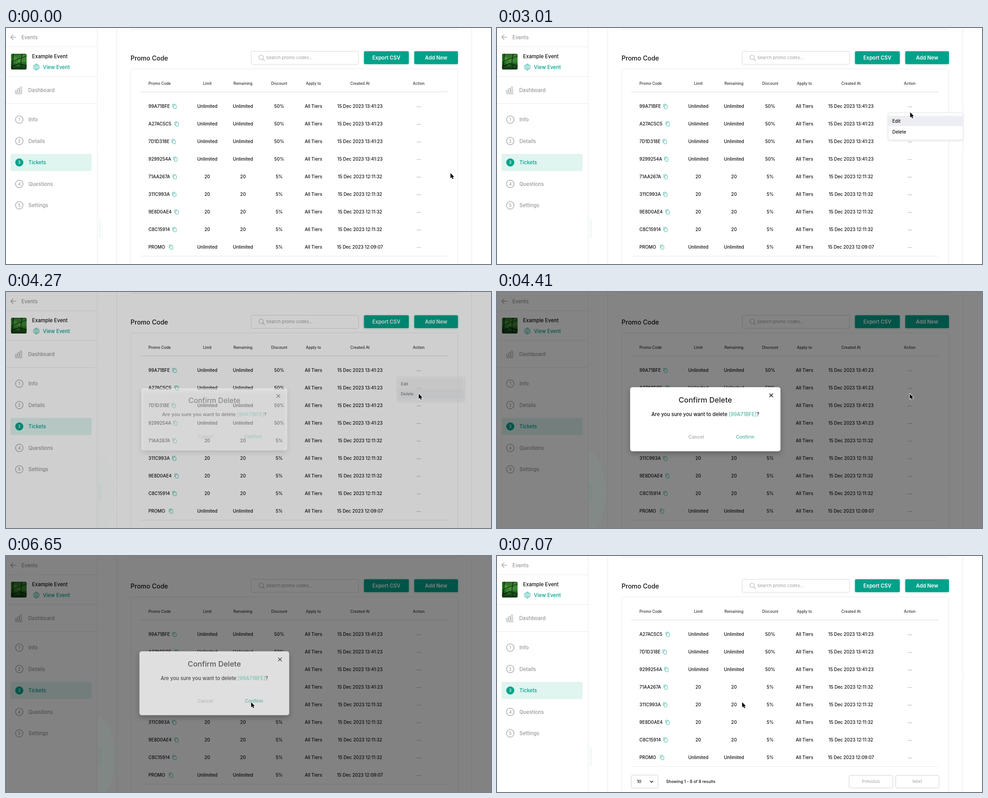
An HTML page with a canvas that plays this animation: 1071x523 px, repeating every 9.1 s.

```html
<!DOCTYPE html>
<html lang="en">
<head>
<meta charset="utf-8">
<title>Delete a promo code</title>
<style>
html, body { margin: 0; width: 100%; height: 100%; overflow: hidden; background: #fff; }
canvas { display: block; width: 1071px; height: 523px; }
</style>
</head>
<body>
<canvas id="stage"></canvas>
<script>
const W = 1071, H = 523, LOOP = 9100, STEP = 70;
const TEAL = '#00a28a', GRAY = '#979797', LINE = '#e8e8e8', INK = '#111';
const canvas = document.getElementById('stage');
const ctx = canvas.getContext('2d');
const dpr = window.devicePixelRatio || 1;
canvas.width = W * dpr;
canvas.height = H * dpr;

const clamp = v => Math.max(0, Math.min(1, v));
const mix = (a, b, u) => a + (b - a) * u;

// y is the middle of the capital letters
function text(s, x, y, size, color = INK, weight = 500, align = 'left') {
  ctx.font = `${weight} ${size}px Inter, sans-serif`;
  ctx.textAlign = align;
  ctx.fillStyle = color;
  ctx.fillText(s, x, y + size * 0.36);
}

function line(pts, color, width = 1) {
  ctx.beginPath();
  pts.forEach(([x, y], i) => i ? ctx.lineTo(x, y) : ctx.moveTo(x, y));
  ctx.strokeStyle = color;
  ctx.lineWidth = width;
  ctx.stroke();
}

function box(x, y, w, h, r, fill, stroke) {
  ctx.beginPath();
  ctx.roundRect(x, y, w, h, r);
  if (fill) { ctx.fillStyle = fill; ctx.fill(); }
  if (stroke) { ctx.strokeStyle = stroke; ctx.lineWidth = 1; ctx.stroke(); }
}

function circle(x, y, r, fill, stroke, width = 1) {
  ctx.beginPath();
  ctx.arc(x, y, r, 0, Math.PI * 2);
  if (fill) { ctx.fillStyle = fill; ctx.fill(); }
  if (stroke) { ctx.strokeStyle = stroke; ctx.lineWidth = width; ctx.stroke(); }
}

function shadow(color, blur, dy) {
  ctx.shadowColor = color;
  ctx.shadowBlur = blur * dpr;
  ctx.shadowOffsetY = dy * dpr;
}
const noShadow = () => shadow('transparent', 0, 0);

// ---- sidebar ----
function thumbnail() {
  ctx.save();
  ctx.beginPath();
  ctx.roundRect(11, 57, 34.5, 35, 3);
  ctx.clip();
  const g = ctx.createLinearGradient(0, 57, 0, 92);
  g.addColorStop(0, '#2c6a26');
  g.addColorStop(0.45, '#3f8a35');
  g.addColorStop(0.7, '#1f5a20');
  g.addColorStop(1, '#0d330f');
  ctx.fillStyle = g;
  ctx.fillRect(11, 57, 35, 35);
  for (const [x, y, r] of [[20, 67, 4], [31, 72, 5], [39, 63, 4], [25, 80, 4]])
    circle(x, y, r, 'rgba(110,180,80,.28)');
  line([[16, 56], [14, 93]], '#0c2a0d', 2);
  line([[36, 56], [33, 74], [35, 93]], '#0c2a0d', 1.6);
  line([[11, 76], [24, 70], [46, 62]], '#123c14', 1.4);
  line([[11, 86], [28, 79], [46, 84]], '#0c2a0d', 2);
  ctx.restore();
}

function globe(x, y) {
  circle(x, y, 6.5, null, TEAL, 0.8);
  ctx.beginPath();
  ctx.ellipse(x, y, 3, 6.5, 0, 0, Math.PI * 2);
  ctx.lineWidth = 0.6;
  ctx.stroke();
  line([[x, y - 6.5], [x, y + 6.5]], TEAL, 0.6);
  for (const dy of [-2.3, 2.3]) line([[x - 6, y + dy], [x + 6, y + dy]], TEAL, 0.6);
}

function sidebar() {
  line([[201.5, 0], [201.5, H]], LINE);
  for (const y of [41.5, 107.5, 167.5]) line([[0, y], [201, y]], LINE);
  line([[22, 20.5], [11, 20.5]], GRAY, 1.2);
  line([[16, 15], [10.5, 20.5], [16, 26]], GRAY, 1.2);
  text('Events', 34, 20.5, 11.2, GRAY);
  thumbnail();
  text('Example Event', 57.5, 63, 11.2);
  globe(67, 86.5);
  text('View Event', 81.5, 87, 11.2, TEAL);
  [[20.5, 138], [25.8, 134], [31.1, 130.5]].forEach(([x, y]) =>
    box(x, y, 3.6, 143.5 - y, 1, null, GRAY));
  line([[20, 145.8], [36, 145.8]], GRAY);
  text('Dashboard', 49, 138, 11.2, GRAY);
  box(10, 279, 179, 38, 3, '#e0f4f0');
  ['Info', 'Details', 'Tickets', 'Questions', 'Settings'].forEach((name, i) => {
    const y = 203 + i * 47.5, on = i === 2;
    circle(29.3, y, 8.3, on ? TEAL : null, on ? TEAL : GRAY, 1.2);
    text(i + 1, 29.3, y, 8.8, on ? '#fff' : GRAY, 500, 'center');
    text(name, 49.5, y, 11.2, on ? TEAL : GRAY);
  });
}

// ---- promo code table ----
const NEW = '15 Dec 2023 13:41:23', OLD = '15 Dec 2023 12:11:32';
const ROWS = [
  ['99A71BFE', 372, 'Unlimited', '50%', NEW],
  ['A27AC5C5', 377, 'Unlimited', '50%', NEW],
  ['7D1D318E', 370.5, 'Unlimited', '50%', NEW],
  ['9299254A', 374, 'Unlimited', '50%', NEW],
  ['71AA267A', 372.5, '20', '5%', OLD],
  ['311C993A', 371.5, '20', '5%', OLD],
  ['9E8D0AE4', 376.5, '20', '5%', OLD],
  ['C8C15914', 372, '20', '5%', OLD],
  ['PROMO', 364.5, 'Unlimited', '5%', '15 Dec 2023 12:09:07'],
];
const COLS = [['Limit', 444.5], ['Remaining', 523.3], ['Discount', 603.3],
  ['Apply to', 679], ['Created At', 781.7], ['Action', 911.5]];

function copyIcon(x, y) {
  const c = '#45b9a6';
  line([[x - 4.1, y + 2.5], [x - 4.1, y - 4.6], [x + 2, y - 4.6]], c);
  box(x - 2.2, y - 2.8, 6.2, 7.8, 1, '#fff', c);
}

function button(x, w, label) {
  shadow('rgba(0,162,138,.35)', 4, 1);
  box(x, 51.5, w, 28.5, 2.5, TEAL);
  noShadow();
  text(label, x + w / 2, 66, 11.2, '#fff', 600, 'center');
}

function footer(y) {
  box(296.5, y - 14.5, 59, 29, 3, '#fff', '#cfcfcf');
  text('10', 309, y, 9.2);
  line([[338, y - 1.8], [341.3, y + 1.8], [344.6, y - 1.8]], INK, 1.4);
  text('Showing 1 - 8 of 8 results', 373.5, y, 9);
  box(777.5, y - 14, 96.5, 28, 3, '#fff', '#cfcfcf');
  text('Previous', 825.7, y, 9.6, '#a3a3a3', 400, 'center');
  box(880.5, y - 14, 95.5, 28, 3, '#fff', '#cfcfcf');
  text('Next', 928, y, 9.6, '#a3a3a3', 400, 'center');
}

function mainPanel(rows) {
  ctx.fillStyle = 'rgba(0,180,160,.05)';
  ctx.fillRect(204, 425, 6, 40);
  for (const x of [244.5, 1028.5]) line([[x, 0], [x, H]], LINE);
  line([[275, 2.5], [998, 2.5]], LINE);
  text('Promo Code', 275, 66.5, 14);
  box(541.5, 51.5, 237, 29, 3, '#fff', '#d8d8d8');
  circle(563.5, 65, 5, null, '#b0b0b0', 1.1);
  line([[567, 68.6], [571.5, 73]], '#b0b0b0', 1.1);
  text('Search promo codes...', 574.5, 66, 9.6, '#9d9d9d', 400);
  button(790.5, 99, 'Export CSV');
  button(901.5, 96.5, 'Add New');

  box(275.5, 90.5, 722, 500, 4, null, LINE);
  text('Promo Code', 314.5, 123, 8.4, '#333');
  for (const [name, x] of COLS) text(name, x, 123, 8.4, '#333', 500, 'center');
  line([[296, 141.5], [976, 141.5]], '#dadada');
  rows.forEach(([code, icon, limit, off, date], i) => {
    const y = 173.5 + i * 39;
    text(code, 314.5, y, 9.9);
    copyIcon(icon, y);
    [limit, limit, off, 'All Tiers', date].forEach((s, c) =>
      text(s, COLS[c][1], y, 9.9, INK, 500, 'center'));
    for (const dx of [-3.2, 0, 3.2]) circle(911.5 + dx, y + 1, 0.75, '#666');
  });
  const end = 154.5 + rows.length * 39;
  line([[296, end], [976, end]], LINE);
  footer(end + 33.5);
}

// ---- row menu ----
function menu(v, active) {
  if (v <= 0) return;
  const s = 0.8 + 0.2 * v;
  ctx.save();
  ctx.globalAlpha = v;
  ctx.translate(864, 188);
  ctx.scale(s, s);
  shadow('rgba(0,0,0,.16)', 5, 1);
  box(0, 0, 165, 60, 3, '#fff');
  noShadow();
  box(0, 0, 165, 60, 3, null, '#e8e8e8');
  if (active >= 0) box(0.5, 6.5 + active * 23.7, 164, 23, 0, '#eceef3');
  text('Edit', 9, 18, 10);
  text('Delete', 9, 42, 10);
  ctx.restore();
}

// ---- confirm dialog ----
function dialog(a, closing, hover) {
  if (a <= 0) return;
  const s = 0.95 + 0.05 * (closing ? 1 - (1 - a) ** 2 : a);
  const tone = closing ? Math.round(255 - (1 - a) * 100) : 255;
  ctx.save();
  ctx.translate(460, 282);
  ctx.scale(s, s);
  ctx.translate(-460, -282);
  ctx.globalAlpha = closing ? 1 - (1 - a) ** 3 : a;
  shadow('rgba(0,0,0,.25)', 12, 5);
  box(294, 211, 332, 142, 5, `rgb(${tone},${tone},${tone})`);
  noShadow();
  ctx.globalAlpha = a;
  line([[601.5, 225], [609.5, 233]], INK, 1.4);
  line([[609.5, 225], [601.5, 233]], INK, 1.4);
  text('Confirm Delete', 460, 239, 16.4, '#222', 500, 'center');
  const parts = [['Are you sure you want to delete ', INK], ['[99A71BFE]', '#52b8a6'], ['?', INK]];
  ctx.font = '500 11.1px Inter, sans-serif';
  const widths = parts.map(p => ctx.measureText(p[0]).width);
  let x = 460 - widths.reduce((n, w) => n + w) / 2;
  parts.forEach(([s, c], i) => { text(s, x, 270.7, 11.1, c); x += widths[i]; });
  text('Cancel', 440, 321.5, 10.4, '#a9a9a9', 500, 'center');
  text('Confirm', 548, 321.5, 10.5, hover ? '#2fa08b' : '#4db19e', 500, 'center');
  ctx.restore();
}

// ---- pointer ----
const MOVES = [[280, 1260, 912.5, 178.5, 7.5], [2940, 3500, 911.5, 225.5, 6], [4970, 5950, 541.3, 324, 7.5]];
const HANDS = [[1050, 2940], [3640, 4200], [6020, 6580]];
const CLICKS = [[2030, 2240, 1], [3990, 4200, 0.5], [6300, 6580, 0.5]];

function damped(u, k) {
  const f = v => 1 - (1 + k * v) * Math.exp(-k * v);
  return f(clamp(u)) / f(1);
}

function pointerAt(t) {
  let x = 981.5, y = 321.5;
  for (const [from, to, tx, ty, k] of MOVES) {
    const u = damped((t - from) / (to - from), k);
    x = mix(x, tx, u);
    y = mix(y, ty, u);
  }
  return [x, y];
}

const ARROW = new Path2D('M0 0V11.6L2.6 9.1L4.5 13.2L6.5 12.3L4.7 8.4H8.2Z');
const HAND = new Path2D('M-1.4 8.3V1.2C-1.4 -.3 1 -.3 1 1.2V5.2C1.4 4.3 3.2 4.5 3.3 5.7' +
  'C3.8 4.9 5.5 5.2 5.6 6.4C6.2 5.8 7.8 6.2 7.8 7.4V10C7.8 12 6.6 12.6 6.4 14.6H-.1' +
  'C-.5 12.8 -2.6 11.4 -4 9C-4.7 7.6 -2.9 6.8 -1.4 8.3Z');

function pointer(t) {
  const [x, y] = pointerAt(t);
  const within = ([a, b]) => t >= a && t < b;
  const click = CLICKS.find(within);
  ctx.save();
  ctx.translate(x, y);
  if (click) {
    ctx.globalAlpha = t === click[0] ? click[2] : 1;
    circle(0.3, 0.2, 25.8, null, '#111', 1.3);
    ctx.globalAlpha = 1;
  }
  ctx.lineJoin = 'round';
  if (HANDS.some(within)) {
    ctx.fillStyle = '#fff';
    ctx.fill(HAND);
    ctx.strokeStyle = '#111';
    ctx.lineWidth = 1;
    ctx.stroke(HAND);
    for (const dx of [1.4, 3.2, 5]) line([[dx, 9], [dx, 12.2]], '#111', 0.7);
  } else {
    ctx.strokeStyle = '#fff';
    ctx.lineWidth = 1.8;
    ctx.stroke(ARROW);
    ctx.fillStyle = '#000';
    ctx.fill(ARROW);
  }
  ctx.restore();
}

// ---- timeline ----
function menuState(t) {
  if (t < 2240 || t > 4400) return 0;
  if (t < 4200) return 1 - (1 - clamp((t - 2200) / 320)) ** 2;
  return clamp(1 - (t - 4170) / 200);
}

function opening(t, length) {
  const u = clamp((t - 4160) / length);
  return mix(u, u * u * (3 - 2 * u), 0.7);
}

function dim(amount) {
  if (amount <= 0) return;
  ctx.fillStyle = `rgba(0,0,0,${0.5 * amount})`;
  ctx.fillRect(0, 0, W, H);
  ctx.save();
  ctx.beginPath();
  ctx.rect(202, 340, 42, 183);
  ctx.clip();
  ctx.beginPath();
  ctx.ellipse(200, 446, 40, 92, 0, 0, Math.PI * 2);
  ctx.fillStyle = `rgba(110,205,170,${0.07 * amount})`;
  ctx.fill();
  ctx.restore();
}

function draw(t) {
  ctx.setTransform(dpr, 0, 0, dpr, 0, 0);
  ctx.fillStyle = '#fff';
  ctx.fillRect(0, 0, W, H);
  sidebar();
  mainPanel(t < 7000 ? ROWS : ROWS.slice(1));
  menu(menuState(t), t < 3010 ? -1 : t < 3150 ? 0 : 1);
  const closing = t >= 6580;
  const shade = closing ? 1 - clamp((t - 6580) / 490) ** 2 : opening(t, 270);
  const alpha = closing ? 1 - clamp((t - 6555) / 340) : opening(t, 250);
  dim(shade);
  dialog(alpha, closing, t >= 5880);
  pointer(t);
}

const start = performance.now();
function tick() {
  const t = (performance.now() - start) % LOOP;
  draw(Math.floor(t / STEP) * STEP);
  requestAnimationFrame(tick);
}
tick();
</script>
</body>
</html>
```
